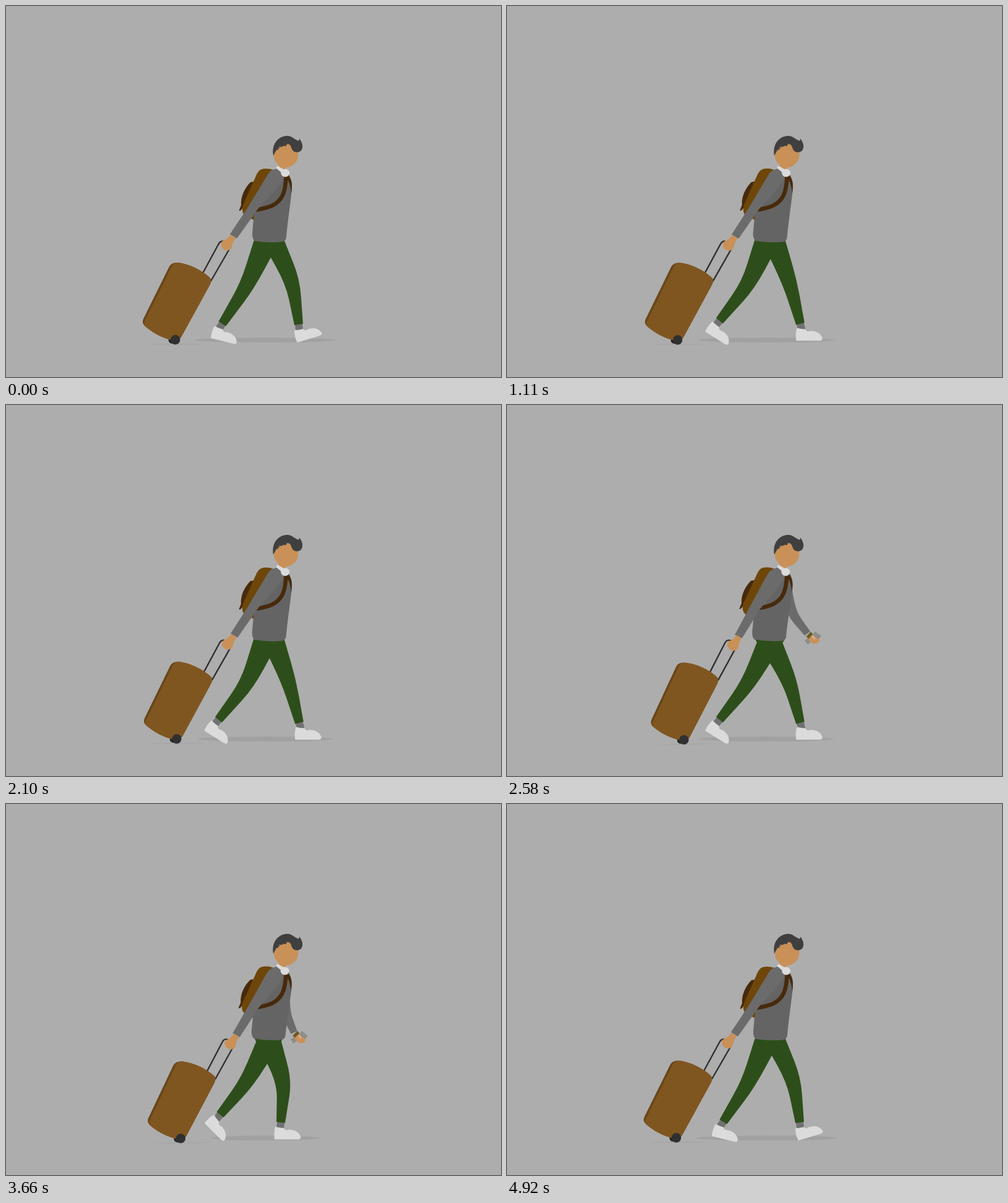
An HTML page for the animation above (4.95 s loop, 800 by 600 pixels).

```html
<!DOCTYPE html>
<html lang="en">
<head>
<meta charset="utf-8">
<title>Walking traveller</title>
<style>
  html, body { margin: 0; width: 100%; height: 100%; overflow: hidden; background: #adadad; }
  svg { display: block; width: 100vw; height: 100vh; }
  .gray { fill: #646464; }
  .sleeve { fill: #6b6b6b; }
  .skin { fill: #c99057; }
  .white { fill: #dbdbdb; }
  .pants { fill: #2d4e1a; }
  .sock { stroke: #717171; stroke-width: 12; }
  .strap { fill: none; stroke: #472a0c; stroke-width: 6.5; }
  .dark { fill: #472a0c; }
  .rod { fill: none; stroke: #303030; stroke-width: 2.4; }
</style>
</head>
<body>
<svg viewBox="0 0 800 600">
  <defs>
    <path id="shoe" class="white" d="M-8,-3 Q-11,8 -9,17.5 L29,17.5 Q34,17 33,13 C30,4 20,1 13,2 Q8,4 6,-1 Q0,-1 -8,-3Z"/>
    <g id="leg">
      <path class="sock"/>
      <use href="#shoe"/>
      <path class="pants"/>
    </g>
  </defs>

  <ellipse id="shadow" cx="419" cy="540.3" ry="4" fill="#a1a1a1"/>

  <path id="farSleeve" class="sleeve"/>
  <g id="farHand">
    <path d="M-5,14 L3,7 M7,-1 L17,6" stroke="#8d8d89" stroke-width="8"/>
    <path class="skin" d="M-1,3 Q2,-2 6,2 L10,6 Q17,6 16,12 Q11,17 5,15 Q1,12 -2,8Z"/>
    <path d="M5,3 L9,8" stroke="#d6ab82" stroke-width="4"/>
    <path d="M-3,6 L4,-2" stroke="#6d5a22" stroke-width="5"/>
  </g>

  <g id="farLeg"></g>
  <g id="nearLeg"></g>
  <path class="pants" d="M401,372 H447 L444,388 H405Z"/>

  <g id="case">
    <ellipse cx="276" cy="547" rx="44" ry="1" fill="#a6a6a6"/>
    <path class="rod" d="M318,432 L343,386 Q346,380 350,380.500 L359,383 M331,445 L361,393"/>
    <circle cx="268.500" cy="540" r="6" fill="#252525"/>
    <path fill="#69461a" d="M264,421 Q268,414.500 277,415 C296,417 316,427 329,439 Q333,443 330,450 L285,532 Q280,543 271,541 C252,537 238,529 225,518 Q219,513 222,506Z"/>
    <path fill="#805620" d="M268,421 Q272,414.500 278,415 C296,417 316,427 329,439 Q333,443 330,450 L285,532 Q280,543 271,541 C252,537 238,529 226,519 Q222,516 224,510Z"/>
    <circle cx="273.700" cy="539.700" r="7.700" fill="#303030"/>
  </g>

  <g id="torso">
    <path class="dark" d="M401,284 L395,285 C385,295 379,309 380,322 L376.500,331 L379,331 L384,325Z"/>
    <path fill="#6e4609" d="M432,265 Q422,261.500 413,264 Q407,266 403,277 L383,322 Q380,334 386,339 L402,347 L430,300Z"/>
    <path class="gray" d="M432,266 L438,262 L455,269 Q463,280 462,297 C459,325 455,350 453,374 Q452,381 446,381.500 Q424,383.500 402,380 Q398,377 398,368 L400,345 L408,300Z"/>
    <path class="dark" d="M455,273 C463,280 463,290 461,303 C460,292 458,286 455,281Z"/>
    <path class="strap" d="M452.500,275 C452,302 446,315 430,323 Q418,328 402,330"/>
  </g>

  <path id="nearSleeve" class="sleeve"/>
  <path id="nearHand" class="skin" d="M363,370 L371,376 Q367,381 365,389 Q364,395 357,395.500 Q349,394 347.500,387 Q347,381 352,379 Q358,377 363,370Z"/>

  <g>
    <path class="skin" d="M440,252 L441,262 L449,268 L455,257Z"/>
    <ellipse class="skin" cx="452.500" cy="240" rx="20" ry="21"/>
    <path fill="#3f3f3f" d="M432,242 C429,225 438,211 454,210 C463,210 467,217 473,218 Q474,217 474,214.500 C478,219 481,227 478,232 C477,235 473,237 469,236.500 C463,236 462,231 460,226 Q458,222.500 454,223.500 L452,227 L449,226 L445,228 L441,227 L443,230 L439,229.500 L441,232 L437,233Z"/>
    <path class="white" d="M436,262 L439,258.500 L450,265 L446,270Z"/>
    <ellipse id="collar" class="white" cx="451.300" cy="270" rx="7" ry="6.500"/>
  </g>
</svg>

<script>
const $ = id => document.getElementById(id);
const set = (el, name, value) => el.setAttribute(name, value);
const mix = (a, b, t) => a + (b - a) * t;
const mixPt = (a, b, t) => a.map((v, i) => mix(v, b[i], t));

// step phase, knee x y, ankle x y, foot angle
const stride = [
  [0, 463.5, 446, 473, 515, -17],
  [0.0625, 462, 446, 479.5, 514, -4],
  [0.125, 457, 447, 474, 514, 0],
  [0.219, 450, 450, 444, 515, 0],
  [0.36, 419, 450, 397, 515, 0],
  [0.5, 390, 452, 349.5, 514, 14],
  [0.625, 390, 451, 343.5, 509, 32],
  [0.719, 390, 449, 346, 502.5, 45],
  [0.79, 417, 447, 372, 497, 39],
  [0.86, 444, 445, 412, 504, 18],
  [0.93, 461, 444, 450, 511, -8]
];

function keyAt(i) {
  const n = stride.length, turn = Math.floor(i / n);
  const key = stride[i - turn * n].slice();
  key[0] += turn;
  return key;
}

// Cubic Hermite through the periodic stride poses
function poseAt(u) {
  u -= Math.floor(u);
  let i = stride.length - 1;
  while (stride[i][0] > u) i--;
  const [a, b, c, d] = [-1, 0, 1, 2].map(k => keyAt(i + k));
  const span = c[0] - b[0], t = (u - b[0]) / span;
  return b.slice(1).map((v, j) => {
    const k = j + 1;
    const m0 = (c[k] - a[k]) / (c[0] - a[0]) * span;
    const m1 = (d[k] - b[k]) / (d[0] - b[0]) * span;
    const diff = c[k] - v;
    return v + t * (m0 + t * (3 * diff - 2 * m0 - m1 + t * (m0 + m1 - 2 * diff)));
  });
}

function normal(a, b, width) {
  const dx = b[0] - a[0], dy = b[1] - a[1], len = Math.hypot(dx, dy);
  return [dy / len * width, -dx / len * width];
}
const shift = (p, n, sign) => [p[0] + n[0] * sign, p[1] + n[1] * sign];
const pair = (p, n) => [shift(p, n, -1), shift(p, n, 1)];

// Tapered limb with a rounded joint on both edges
function limb(top, mid, end) {
  const side = i => [mixPt(top[i], mid[i], 0.62), mid[i], mixPt(mid[i], end[i], 0.38)];
  const [a, b, c] = side(0), [d, e, f] = side(1);
  return `M${top[0]} L${a} Q${b} ${c} L${end[0]} L${end[1]} L${f} Q${e} ${d} L${top[1]}Z`;
}

function drawLeg(el, u, left, right) {
  const [kx, ky, ax, ay, angle] = poseAt(u);
  const knee = [kx, ky], ankle = [ax, ay];
  const kneeWidth = normal([425, 375], ankle, 12), cuffWidth = normal(knee, ankle, 7);
  const foot = mixPt(knee, ankle, 1 + 10 / Math.hypot(ax - kx, ay - ky));
  const [sock, shoe, pants] = el.children;
  set(sock, "d", `M${mixPt(foot, ankle, 1.3)} L${foot}`);
  set(shoe, "transform", `translate(${foot}) rotate(${angle})`);
  set(pants, "d", limb([[left, 375], [right, 375]], pair(knee, kneeWidth), pair(ankle, cuffWidth)));
}

for (const id of ["farLeg", "nearLeg"])
  for (const part of $("leg").children) $(id).append(part.cloneNode(true));

function draw(p) {
  const s = (1 - Math.cos(2 * Math.PI * p)) / 2;

  set($("shadow"), "rx", 98 + 20 * Math.cos(4 * Math.PI * (p - 0.05)));
  drawLeg($("farLeg"), p, 410 - 3 * s, 448 + 4 * s);
  drawLeg($("nearLeg"), p + 0.5, 402 - 4 * s, 445 - 4 * s);

  set($("case"), "transform", `translate(${11.7 * s} ${0.4 * s}) rotate(${-1.6 * s} 331 443)`);
  set($("torso"), "transform", `rotate(${1.15 * s} 450 262)`);
  set($("collar"), "cx", 451.3 - s);

  const wrist = [419 + 78 * s, 369.5], elbow = [431 + 34 * s, 337];
  set($("farSleeve"), "d", limb([[442, 285], [458, 285]],
    pair(elbow, normal([452, 280], wrist, 8)),
    pair(wrist, normal(elbow, wrist, 5.5))));
  set($("farHand"), "transform", `translate(${wrist[0] + 3} ${wrist[1] + 1}) rotate(${-20 * (s - 0.854)})`);

  const cuff = [[362 + 7.3 * s, 369 + 3 * s], [373 + 8 * s, 376 + 1.5 * s]];
  const bend = [[390 + 2 * s, 327 + s], [408 + 1.5 * s, 327 + 3 * s]];
  set($("nearSleeve"), "d", `M${cuff[0]} L${bend[0]} L${421 - 1.5 * s},276 Q427,263 437,264
    Q450,270 448,281 Q443,290 ${bend[1]} L${cuff[1]}Z`);
  set($("nearHand"), "transform", `translate(${9.5 * s} ${2 * s}) rotate(${-3 * s} 367 373)`);
}

// 33 steps of 30 ms per cycle; the last pose equals the first
function tick(now) {
  const step = Math.floor(now / 30) % 33;
  draw(step / 32);
  requestAnimationFrame(tick);
}
draw(0);
requestAnimationFrame(tick);
</script>
</body>
</html>
```
